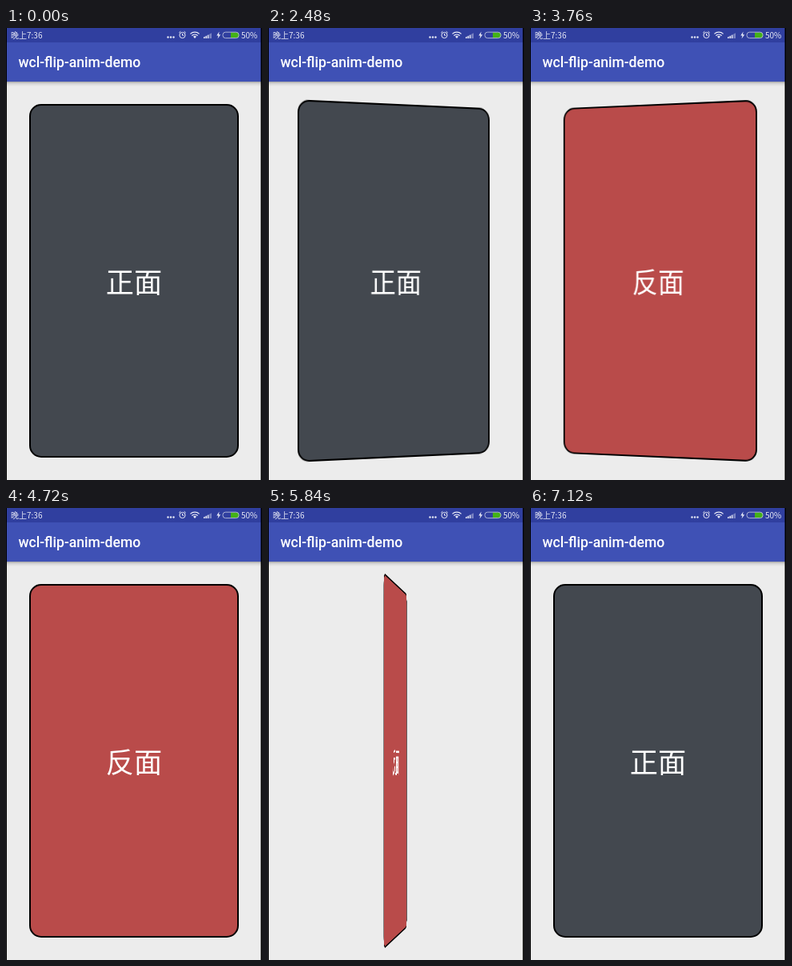
An HTML page for the animation above (7200 ms loop, 320 by 565 pixels).

```html
<!DOCTYPE html>
<html lang="zh-CN">
<head>
<meta charset="utf-8">
<title>wcl-flip-anim-demo</title>
<style>
  html, body { margin: 0; width: 100%; height: 100%; overflow: hidden; background: #ececec; }
  #stage { position: relative; width: 320px; height: 565px; overflow: hidden; background: #ececec; }
  #chrome { position: absolute; inset: 0; }
  .card {
    position: absolute; left: 29px; top: 95px; width: 262px; height: 442px;
    box-sizing: border-box; border: 2px solid #000; border-radius: 15px; padding-bottom: 2px;
    display: flex; align-items: center; justify-content: center;
    color: #fff; font: 35.2px "Noto Sans CJK SC", "Noto Sans CJK", sans-serif;
  }
  #front { background: #43484f; }
  #back { background: #b94b4a; }
  .status { font: 10px "Noto Sans CJK SC", "Noto Sans CJK", sans-serif; }
  .title { font: 500 17.6px Roboto, sans-serif; }
</style>
</head>
<body>
<div id="stage">
  <svg id="chrome" width="320" height="565" viewBox="0 0 320 565">
    <defs>
      <linearGradient id="shadow" x2="0" y2="1">
        <stop offset="0" stop-color="#000" stop-opacity=".3"/>
        <stop offset=".4" stop-color="#000" stop-opacity=".1"/>
        <stop offset="1" stop-color="#000" stop-opacity="0"/>
      </linearGradient>
    </defs>
    <rect width="320" height="18" fill="#303f9f"/>
    <rect y="18" width="320" height="49" fill="#3f51b5"/>
    <rect y="67" width="320" height="6" fill="url(#shadow)"/>
    <g fill="#e8eaf6">
      <text class="status" x="6" y="12.5">晚上7:36</text>
      <text class="status" x="294" y="12.5">50%</text>
      <circle cx="202.5" cy="11.5" r="1.2"/>
      <circle cx="206" cy="11.5" r="1.2"/>
      <circle cx="209.5" cy="11.5" r="1.2"/>
      <path d="M236 13l-2-2.3a3 3 0 0 1 4 0z"/>
      <path d="M247 13v-1.6l1.6-.8V13zM249.4 13v-2.8l1.6-.8V13zM251.8 13V9l1.6-.8V13z"/>
      <path d="M254.2 13V7.8l2.8-1.6V13z" opacity=".4"/>
      <path d="M266.5 4.5l-3.2 5h2.2l-1 4 3.7-5.3H266z"/>
    </g>
    <g fill="none" stroke="#e8eaf6">
      <circle cx="220.5" cy="9" r="3.6"/>
      <path d="M220.5 7v2.2h1.8M216.3 6l2-1.8M224.7 6l-2-1.8"/>
      <path d="M230.4 7.4a8 8 0 0 1 11.2 0M232.3 9.5a5.4 5.4 0 0 1 7.4 0" stroke-width="1.2"/>
    </g>
    <path d="M281 5.5h7a3.2 3.2 0 0 1 0 6.8h-7z" fill="#43b117"/>
    <rect x="271" y="5.2" width="20" height="7.4" rx="3.4" fill="none" stroke="#b9c0dc" stroke-width=".9"/>
    <text class="title" x="15.5" y="49" fill="#fff">wcl-flip-anim-demo</text>
    <rect width="1" height="565"/>
    <rect x="318.5" width="1.5" height="565"/>
  </svg>
  <div id="front" class="card">正面</div>
  <div id="back" class="card">反面</div>
</div>
<script>
  const LOOP = 7200, FLIP = 2400, FLIP_STARTS = [1914, 4695], CAMERA = 2113;
  const front = document.getElementById('front');
  const back = document.getElementById('back');

  const easeInOut = t => (1 - Math.cos(Math.PI * t)) / 2;
  const flipProgress = (time, start) =>
    easeInOut(Math.min(1, Math.max(0, (time - start) / FLIP)));

  function draw(time) {
    const turns = FLIP_STARTS.reduce((sum, start) => sum + flipProgress(time, start), 0);
    const side = Math.round(turns);
    const showsBack = side % 2 === 1;
    const card = showsBack ? back : front;
    front.style.visibility = showsBack ? 'hidden' : 'visible';
    back.style.visibility = showsBack ? 'visible' : 'hidden';
    card.style.transform = `perspective(${CAMERA}px) rotateY(${(turns - side) * 180}deg)`;
  }

  const origin = performance.now();
  function tick() {
    draw((performance.now() - origin) % LOOP);
    requestAnimationFrame(tick);
  }
  tick();
</script>
</body>
</html>
```
